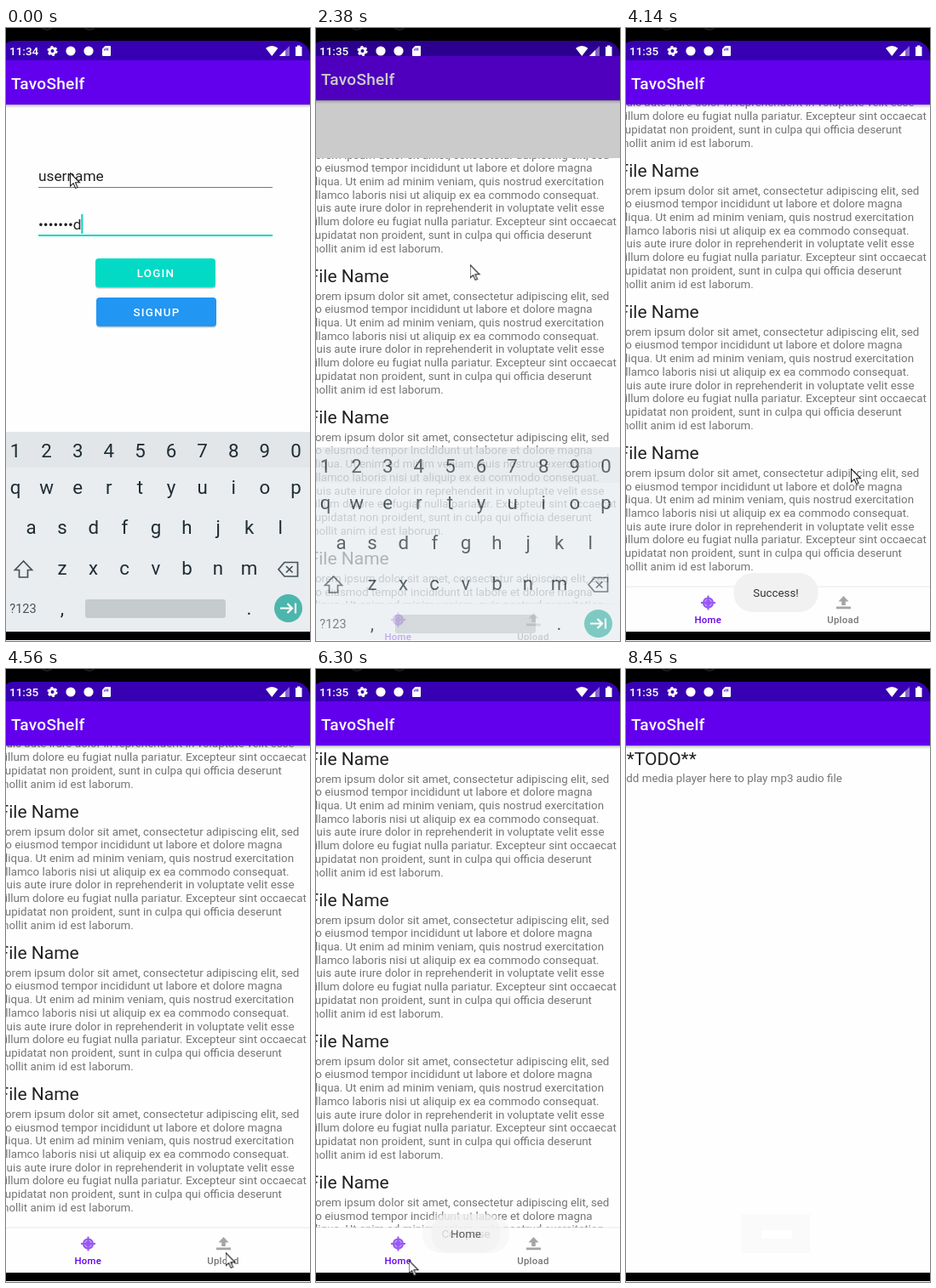
Write an HTML page that moves like this. It is 357 px wide and 721 px high and loops after 8.55 s.

```html
<!DOCTYPE html>
<html lang="en">
<head>
<meta charset="utf-8">
<title>TavoShelf</title>
<style>
  html, body { margin: 0; width: 100%; height: 100%; overflow: hidden; background: #000; }
  #stage { position: relative; width: 357px; height: 721px; overflow: hidden; background: #000; }
  #stage::after { content: ""; position: absolute; left: 0; top: 720px; width: 100%; height: 1px; background: #fff; }
  #screen { position: absolute; inset: 0; clip-path: inset(15px 0 1px -8px round 18px 18px 0 0); }
  svg { position: absolute; left: 0; top: 0; width: 357px; height: 721px; }
  text { font: 13.35px Roboto, Arial, sans-serif; white-space: pre; }
  .mid { text-anchor: middle; }
  .time { font-size: 13.5px; font-weight: 500; fill: #fff; }
  .title { font-size: 19.1px; font-weight: 500; letter-spacing: .24px; fill: #fff; }
  .head { font-size: 21px; fill: #212121; }
  .body { fill: #757575; }
  .field { font-size: 17.3px; fill: #212121; }
  .btn { font-weight: 500; letter-spacing: 1.2px; fill: #fff; }
  .tab { fill: currentColor; stroke: currentColor; }
  .tab text { font-size: 11.4px; font-weight: 500; letter-spacing: .3px; stroke: none; }
  .tab g { opacity: .65; }
  .key { font-size: 22.3px; fill: #1f2d33; }
  .small { font-size: 14.5px; fill: #465258; }
  .toast rect { fill: #f1f1f1; fill-opacity: .96; }
  .toast text { fill: #333; }
  .ripple { fill: #d3d3d3; }
</style>
</head>
<body>
<div id="stage">
  <svg fill="none" stroke="#1c1c1c" stroke-width="2"><circle cx="48" cy="-6" r="8"/><circle cx="98" cy="-6" r="8"/></svg>
  <div id="screen">
    <svg id="login"></svg>
    <svg id="main"></svg>
    <svg id="player"></svg>
    <svg id="toasts"></svg>
    <svg id="keyboard"></svg>
    <svg id="status" fill="#fff">
      <text id="before" class="time" x="4" y="31.5">11:34</text>
      <text id="after" class="time" x="4" y="31.5">11:35</text>
      <circle cx="54.5" cy="27" r="3.4" fill="none" stroke="#fff" stroke-width="2.8"/>
      <circle cx="54.5" cy="27" r="5.1" fill="none" stroke="#fff" stroke-width="2" stroke-dasharray="2.7 2.64"/>
      <circle cx="76" cy="27" r="5.6"/>
      <circle cx="97" cy="27" r="5.6"/>
      <path d="M116.5 21h5.5q1 0 1 1v10q0 1-1 1h-8q-1 0-1-1v-7.5z"/>
      <path d="M115.5 24.5v2m2-3v3m2-3v3" stroke="#3700b3"/>
      <path d="M305 23.8q7.2-5.8 14.4 0L312.2 33z"/>
      <path d="M333 21v12h-12z" opacity=".4"/>
      <path d="M328 26v7h-7z"/>
      <path d="M340 22h2v-1.5h3.5V22h2v11h-7.5z"/>
    </svg>
  </div>
  <svg id="pointer"><path d="M.5 .5v15.5l3.6-3.3 2.5 5.7 2.4-1-2.5-5.6h5z" fill="#fff" stroke="#222" stroke-width="1.1"/></svg>
</div>

<script>
const LOOP = 8550, TICK = 135;
const $ = id => document.getElementById(id);

const text = (x, y, cls, s) => `<text x="${x}" y="${y}" class="${cls}">${s}</text>`;
const rect = (x, y, w, h, fill, rx = 0) =>
  `<rect x="${x}" y="${y}" width="${w}" height="${h}" rx="${rx}" fill="${fill}"/>`;

// Window chrome: app bar with shadow, navigation strip
const page = rect(0, 15, 357, 706, '#fefefe');
const shadow = [0, 1, 2, 3].map(i => rect(0, 90 + i, 357, 1, `rgba(0,0,0,${.28 * .55 ** i})`)).join('');
const chrome = shadow + rect(0, 38, 357, 52, '#6200ee') + rect(0, 0, 357, 38, '#3700b3')
  + text(6, 71.5, 'title', 'TavoShelf') + rect(0, 710, 357, 11, '#000');

const button = (id, x, y, fill, label) =>
  rect(x, y + 1.5, 141, 34, 'rgba(0,0,0,.22)', 4)
  + `<g id="${id}">${rect(x, y, 141, 34, fill, 4)}</g>`
  + text(x + 71, y + 22.3, 'btn mid', label);

$('login').innerHTML = page
  + text(38, 180, 'field', 'username') + rect(38, 187, 275, 1, '#777')
  + text(38, 236.5, 'field', '•••••••d') + rect(88.3, 219, 2, 23, '#03d5c2')
  + rect(38, 243, 275, 2, '#03d5c2')
  + button('enter', 105, 271, '#03dac5', 'LOGIN')
  + button('signup', 106, 317, '#2196f3', 'SIGNUP')
  + chrome;

const lorem = [
  'Lorem ipsum dolor sit amet, consectetur adipiscing elit, sed',
  'do eiusmod tempor incididunt ut labore et dolore magna',
  'aliqua. Ut enim ad minim veniam, quis nostrud exercitation',
  'ullamco laboris nisi ut aliquip ex ea commodo consequat.',
  'Duis aute irure dolor in reprehenderit in voluptate velit esse',
  'cillum dolore eu fugiat nulla pariatur. Excepteur sint occaecat',
  'cupidatat non proident, sunt in culpa qui officia deserunt',
  'mollit anim id est laborum.'
];
const item = y => text(-8.4, y, 'head', 'File Name')
  + lorem.map((s, i) => text(-8.2, y + 21 + i * 15.72, 'body', s)).join('');
const items = Array.from({ length: 6 }, (_, i) => item(112.5 + i * 166.1)).join('');

const tab = (id, x, label, icon) =>
  `<g id="${id}" class="tab"><g>${icon}</g>${text(x, 700, 'mid', label)}</g>`;
const target = `<circle cx="96.5" cy="676" r="6.6" stroke="none"/>
  <circle cx="96.5" cy="676" r="4" fill="none" stroke="#fff" stroke-opacity=".5"/>
  <path d="M96.5 667.5v17m-8.5-8.5h17" stroke-width="2"/>`;
const arrow = `<path d="M255.5 668l6 6.500h-3.700v4.500h-4.600v-4.500h-3.700zM247 680.500h17v2.700h-17z" stroke="none"/>`;
const ripple = (id, x) => `<circle id="${id}" class="ripple" cx="${x}" cy="684"/>`;

$('main').innerHTML = page
  + `<g id="list">${items}</g>`
  + `<g id="upload">${page}${text(-8.4, 104.7, 'body', 'Upload')}</g>`
  + `<clipPath id="bar">${rect(0, 657, 357, 60, '#fff')}</clipPath>`
  + `<g clip-path="url(#bar)">${page}${ripple('rippleHome', 96)}${ripple('rippleUp', 255.5)}</g>`
  + rect(0, 656.5, 357, 1, '#e9e9e9')
  + tab('tabHome', 96.3, 'Home', target) + tab('tabUp', 255, 'Upload', arrow)
  + chrome;

$('player').innerHTML = page + text(-8.4, 112.5, 'head', '**TODO**')
  + text(-8.4, 132.7, 'body', 'Add media player here to play mp3 audio file') + chrome;

const toast = (id, w, label) =>
  `<g id="${id}" class="toast">${rect(176 - w / 2, 641, w, 46, '', 22)}${text(176, 669, 'mid', label)}</g>`;
$('toasts').innerHTML = toast('success', 99, 'Success!') + toast('compose', 102, 'Compose')
  + toast('home', 81, 'Home')
  + `<g id="residue">${rect(135, 641, 81, 46, '#fafafa')}${rect(159, 660, 36, 10, '#fff')}</g>`;

const keys = (s, x, y) => [...s].map((c, i) => text(x + i * 36.6, y, 'key mid', c)).join('');
$('keyboard').innerHTML = rect(0, 475, 357, 235, '#e9edf0') + rect(0, 475, 357, 42, '#e2e6e9')
  + keys('1234567890', 11, 504.7) + keys('qwertyuiop', 11, 548) + keys('asdfghjkl', 29.5, 595.3)
  + keys('zxcvbnm', 66, 643) + text(20, 688, 'small mid', '?123')
  + keys(',', 66, 690) + keys('.', 285.5, 690)
  + rect(93, 672, 165, 22, '#c6cbce', 3)
  + `<g fill="none" stroke="#465258" stroke-width="1.7">
      <path d="M20.5 627l-10 10.500h5v8.500h10v-8.500h5z"/>
      <path d="M327 628.500h15.500v16.500H327l-7-8.250zM329 633l7.500 7.500m0-7.500l-7.500 7.500"/></g>
     <circle cx="331.500" cy="682.500" r="16.500" fill="#4db6ac"/>
     <path d="M322 682.500h14m-5.500-5.500l5.500 5.500-5.500 5.500m9.500-11.500v12" fill="none" stroke="#fff" stroke-width="2.2"/>`
  + rect(0, 710, 357, 11, '#000');

const animate = (id, frames) => $(id).animate(frames, { duration: LOOP, iterations: Infinity });

// Moves between [time, value] points, one step per tick
function track(id, prop, points) {
  const all = [[0, points[0][1]], ...points, [LOOP, points.at(-1)[1]]];
  animate(id, all.map(([t, v], i) => {
    const span = (all[i + 1]?.[0] ?? LOOP) - t;
    return { offset: t / LOOP, [prop]: String(v), easing: `steps(${Math.max(1, Math.round(span / TICK))})` };
  }));
}

// Switches to `on` for one stretch of the loop
function cut(id, prop, off, on, from, to = LOOP) {
  const key = (t, v) => ({ offset: t / LOOP, [prop]: String(v), easing: 'step-end' });
  animate(id, [key(0, off), key(from, on), key(to, to < LOOP ? off : on)]);
}

track('pointer', 'translate', [
  [455, '75px 170px'], [1400, '180.5px 278px'],
  [3200, '180.5px 278px'], [3600, '208.5px 303px'], [4140, '264px 518px'], [4290, '264px 650px'],
  [4530, '257.5px 686px'], [5355, '257.5px 686px'], [5880, '108.5px 695px'],
  [6420, '108.5px 695px'], [6690, '125px 358px'], [7780, '125px 358px'], [8450, '272px 730px']
]);

cut('enter', 'filter', 'none', 'brightness(1.1)', 1520, 1670);
cut('before', 'opacity', 1, 0, 2260);
cut('after', 'opacity', 0, 1, 2260);

// A new window slides up behind a rising clip while the old one dims
function openWindow(old, fresh, from, to) {
  cut(fresh, 'opacity', 0, 1, from);
  track(fresh, 'transform', [[from, 'translateY(40px)'], [to, 'translateY(0px)']]);
  track(fresh, 'clipPath', [[from, 'inset(266px 0px 0px 0px)'], [to, 'inset(0px 0px 0px 0px)']]);
  cut(old, 'filter', 'none', 'brightness(.8)', from + 100, to);
  track(old, 'translate', [[from, '0px 0px'], [to, '0px -10px']]);
  cut(old, 'visibility', 'visible', 'hidden', to);
}
openWindow('login', 'main', 2260, 2500);
openWindow('main', 'player', 7080, 7350);

track('keyboard', 'translate', [[2260, '0px 0px'], [2380, '0px 18px']]);
track('keyboard', 'opacity', [[2260, 1], [2380, .72], [2500, 0]]);

track('list', 'translate', [[3200, '0px 0px'], [3600, '0px -50px'], [4140, '0px -104px'],
  [6030, '0px -104px'], [6031, '0px 0px']]);
cut('upload', 'opacity', 0, 1, 4830, 6150);
cut('tabHome', 'color', '#6200ee', '#757575', 4830, 6030);
cut('tabUp', 'color', '#757575', '#6200ee', 4830, 6030);
track('rippleUp', 'r', [[4700, '0px'], [5100, '80px']]);
track('rippleUp', 'opacity', [[5100, 1], [5370, 0]]);
track('rippleHome', 'r', [[5880, '0px'], [6150, '80px']]);
track('rippleHome', 'opacity', [[6150, 1], [6300, 0]]);

track('success', 'opacity', [[2260, 0], [2800, 1], [4290, 1], [4530, 0]]);
track('compose', 'opacity', [[5100, 0], [5370, 1], [6150, 1], [6420, 0]]);
track('home', 'opacity', [[6180, 0], [6300, .7], [6420, 1], [8180, 1], [8450, 0]]);
cut('residue', 'opacity', 0, 1, 8450);
</script>
</body>
</html>
```
